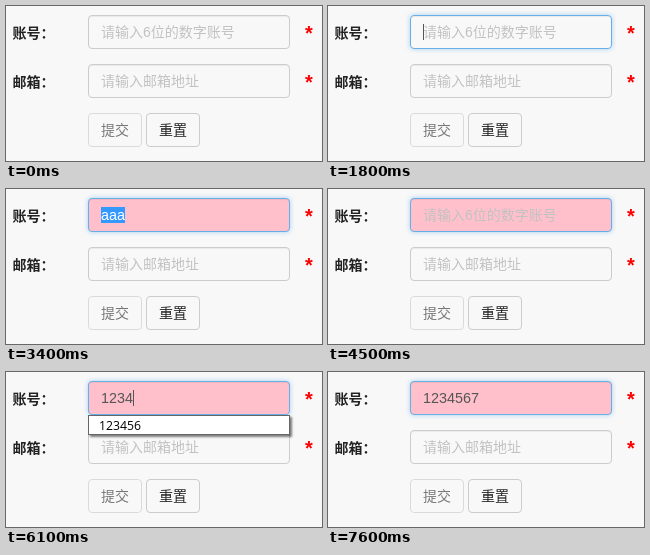
An HTML page that plays this animation: 316x155 px, repeating every 8000 ms.

```html
<!DOCTYPE html>
<html lang="zh-CN">
<head>
<meta charset="utf-8">
<style>
  html, body { margin: 0; width: 100%; height: 100%; overflow: hidden; background: #f8f8f8; }
  body { position: relative; font: 14px/20px "Liberation Sans", "Noto Sans CJK SC", sans-serif; color: #333; }
  body * { position: absolute; box-sizing: border-box; white-space: pre; }
  .label { left: 6.5px; font-weight: bold; color: #222; }
  .label::after { content: "："; font-family: "Noto Sans CJK JP", sans-serif; }
  .star { left: 299px; font: bold 20px/20px "Liberation Sans", sans-serif; color: #f00; }
  .field { left: 82px; width: 202px; height: 34px; border: 1px solid #ccc; border-radius: 4px;
    box-shadow: inset 0 1px 1px rgba(0, 0, 0, .06); }
  .field.focus { border-color: #66afe9;
    box-shadow: inset 0 1px 1px rgba(0, 0, 0, .06), 0 0 5px rgba(102, 175, 233, .55); }
  .hint { left: 12px; top: 6px; color: #c2c2c2; }
  #value { left: 12px; top: 8px; font-size: 14.4px; line-height: 16px; color: #555; }
  #value.selected { background: #39f; color: #fff; }
  #caret { top: 8px; width: 1px; height: 16px; background: #555; }
  #list { left: 82px; top: 43px; width: 202px; height: 20px; padding-left: 10px; background: #fff;
    border: 1px solid #666; box-shadow: 2px 2px 2px rgba(0, 0, 0, .5);
    font: 12.25px/19px "Open Sans", sans-serif; color: #000; }
  .button { top: 107px; width: 54px; height: 34px; padding: 6px 12px; border: 1px solid #ccc;
    border-radius: 4px; }
  #submit { left: 82px; opacity: .65; }
  #reset { left: 140px; color: #222; }
  #reset.hover { background: #e6e6e6; border-color: #adadad; }
</style>
</head>
<body>
  <span class="label" style="top:16px" lang="zh-CN">账号</span>
  <span class="label" style="top:65px" lang="zh-CN">邮箱</span>
  <div class="field" id="account" style="top:9px">
    <span class="hint" id="hint">请输入6位的数字账号</span>
    <span id="value"></span>
    <i id="caret"></i>
  </div>
  <div class="field" style="top:58px"><span class="hint">请输入邮箱地址</span></div>
  <span class="star" style="top:17px">*</span>
  <span class="star" style="top:66px">*</span>
  <div class="button" id="submit">提交</div>
  <div class="button" id="reset">重置</div>
  <div id="list">123456</div>
<script>
  const LOOP = 8000, BLINK = 500, CHAR_WIDTH = 8;
  const PINK = '#ffc0cb', GREEN = '#7cfc88';
  const $ = id => document.getElementById(id);

  // [time, text]: each edit also restarts the caret blink
  const edits = [
    [1800, ''], [2200, 'a'], [2500, 'aa'], [2800, 'aaa'], [4000, ''],
    [5000, '1'], [5200, '12'], [5900, '123'], [6100, '1234'],
    [6400, '12345'], [6700, '123456'], [7100, '1234567']
  ];
  const fills = [[0, 'transparent'], [2300, PINK], [6700, GREEN], [7200, PINK]];

  const latest = (steps, t) => steps.filter(([start]) => start <= t).pop();
  const within = (t, from, to) => t >= from && t < to;

  function render(t) {
    const focused = t >= 1800;
    const [start, text] = latest(edits, t) || [0, ''];
    const selected = within(t, 3400, 4000);
    const caretOn = focused && !selected && Math.floor((t - start) / BLINK) % 2 === 0;

    $('account').classList.toggle('focus', focused);
    $('account').style.backgroundColor = latest(fills, t)[1];
    $('hint').hidden = text !== '';
    $('value').textContent = text;
    $('value').classList.toggle('selected', selected);
    $('caret').hidden = !caretOn;
    $('caret').style.left = 12 + text.length * CHAR_WIDTH + 'px';
    $('list').hidden = !within(t, 5000, 7200);
    $('reset').classList.toggle('hover', within(t, 500, 900));
  }

  const origin = performance.now();
  function tick() {
    render((performance.now() - origin) % LOOP);
    requestAnimationFrame(tick);
  }
  tick();
</script>
</body>
</html>
```
